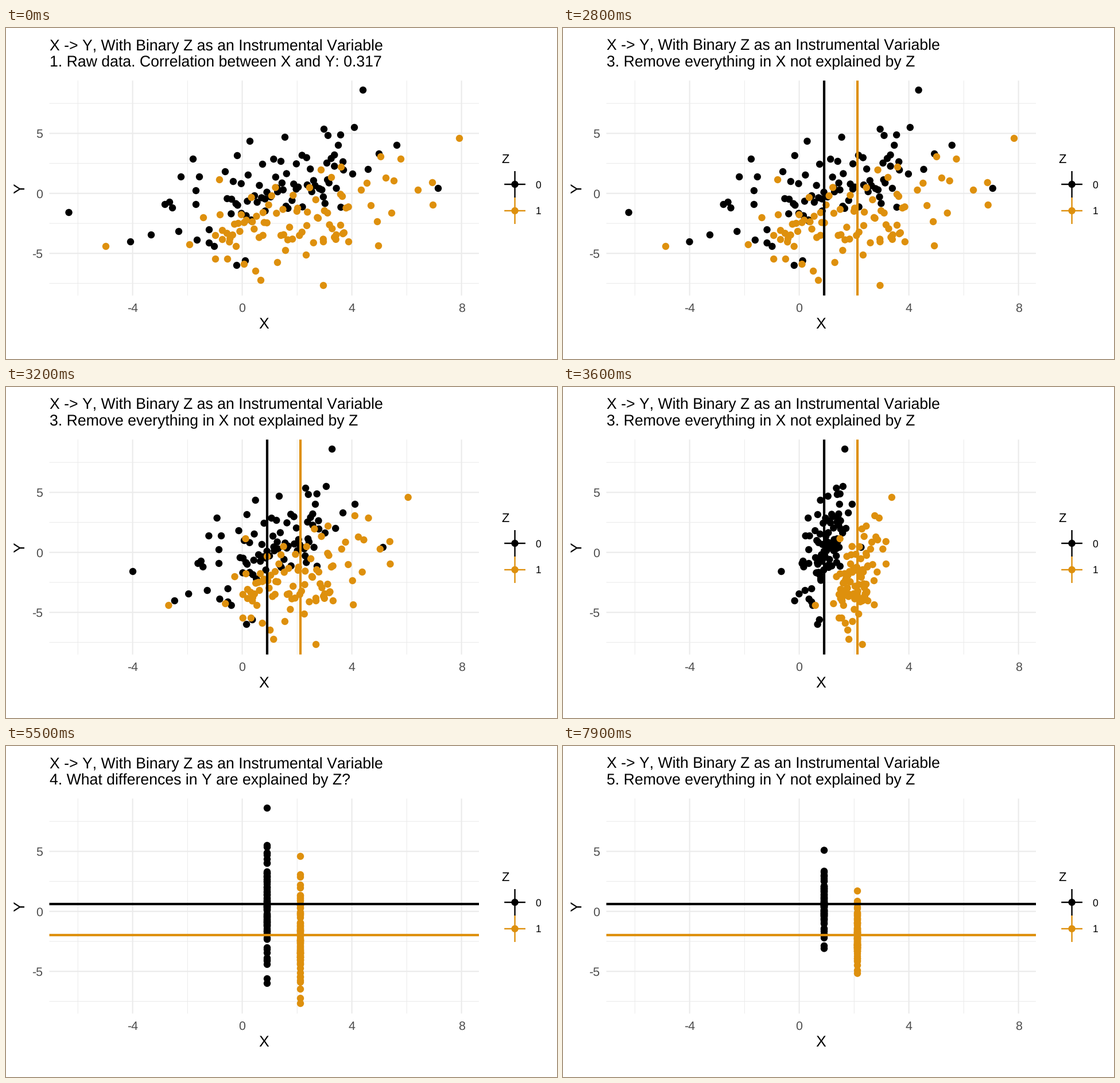
These frames come from a looping animation (960x576 px, 8 s). A matplotlib script:

```python
import numpy as np
import matplotlib.pyplot as plt
from matplotlib.animation import FuncAnimation
from matplotlib.collections import EllipseCollection

W, H, DPI = 960, 576, 96
FRAMES, STEP_MS = 80, 100
BLACK, ORANGE = "#000000", "#DE900D"
GRID, TICK = "#EBEBEB", "#4D4D4D"
LEFT, RIGHT, TOP, BOTTOM = 75.5, 824, 91.5, 465.5
DOT = 12.4

plt.rcParams.update({
    "font.family": "Liberation Sans",
    "text.hinting": "none",
    "text.kerning_factor": 6,  # switches kerning off
})

fig = plt.figure(figsize=(W / DPI, H / DPI), dpi=DPI, facecolor="white")
ax = fig.add_axes([0, 0, 1, 1])
ax.set_xlim(0, W)
ax.set_ylim(H, 0)
ax.axis("off")


def px(size):
    """Pixels to points."""
    return size * 72 / DPI


def line(xs, ys, color, width, z):
    return ax.plot(xs, ys, color=color, lw=px(width), zorder=z, snap=False,
                   solid_capstyle="butt")[0]


def vline(x, color, width, z=1):
    return line([x, x], [TOP, BOTTOM], color, width, z)


def hline(y, color, width, z=1):
    return line([LEFT, RIGHT], [y, y], color, width, z)


def label(x, y, text, size, color="black", ha="left", **kw):
    return ax.text(x, y, text, fontsize=px(size), color=color, ha=ha,
                   va="baseline", **kw)


def dots(places, color, z):
    n = len(places)
    group = EllipseCollection([DOT] * n, [DOT] * n, [0] * n, units="xy",
                              offsets=places, offset_transform=ax.transData,
                              facecolors=color, edgecolors="none", zorder=z)
    ax.add_collection(group)
    return group


def cloud(rng, n, x0, x1, mid, slope, spread):
    """Scattered points around a sloping line, evenly filled along x."""
    step = (x1 - x0) / n
    x = x0 + step * (np.arange(n) + rng.uniform(-0.3, 1.3, n))
    y = mid + slope * (x - (x0 + x1) / 2)
    y += spread * (rng.random(n) - rng.random(n))
    return np.column_stack([x, y])


def ease(t):
    return (1 - np.cos(np.pi * np.clip(t, 0, 1))) / 2


# Outlying points; the crowded middle is filled at random
far_black = [
    (109.5, 321), (217, 372), (253, 360), (301, 354), (277, 307), (285, 303),
    (290, 313), (305, 259), (326, 228), (337, 259), (331, 283), (331, 307),
    (333, 369), (354, 374), (363, 380), (354, 351), (402, 413), (417, 405),
    (382, 250), (403, 222), (425, 197), (486, 190), (479, 232), (447, 237),
    (554, 176), (561, 187), (583, 186), (579, 204), (607, 173), (622, 108),
    (681, 204), (650, 219), (631, 246), (604, 254), (753, 279), (559, 235),
]
far_orange = [
    (174, 380), (320, 377), (344, 330), (372, 264), (373, 325), (365, 361),
    (365, 402), (386, 402), (377, 368), (401, 380), (415, 411), (435, 423),
    (444, 439), (473, 408), (487, 387), (523, 395), (553, 448), (553, 372),
    (587, 358), (597, 372), (586, 293), (549, 247), (567, 260), (584, 242),
    (619, 282), (629, 270), (662, 261), (676, 266), (653, 224), (688, 228),
    (718, 282), (743, 269), (744, 308), (672, 322), (636, 309), (647, 337),
    (649, 379), (790, 192),
]
rng = np.random.default_rng(12)
black_start = np.vstack([far_black, cloud(rng, 56, 385, 590, 275, -0.2, 65)])
orange_start = np.vstack([far_orange, cloud(rng, 55, 378, 600, 333, -0.12, 68)])
black_mean, orange_mean = np.array([455, 275]), np.array([513, 329])

# Grid and tick labels
for k in range(4):
    vline(125.3 + 191 * k, GRID, 1.07)
    hline(131.2 + 104.4 * k, GRID, 1.07)
for k, text in enumerate(["-4", "0", "4", "8"]):
    x = 220.6 + 191 * k
    vline(x, GRID, 2.13, 2)
    label(x, 493.5, text, 21.33, TICK, "center")
for k, text in enumerate(["5", "0", "-5"]):
    y = 183.4 + 104.4 * k
    hline(y, GRID, 2.13, 2)
    label(64, y + 7.8, text, 21.33, TICK, "right")

# Axis names
label(449.7, 523.3, "X", 26.67, ha="center")
label(32, 279, "Y", 26.67, ha="center", rotation=90, rotation_mode="anchor")

# Legend
label(863, 234.6, "Z", 22)
for y, color, text in [(272, BLACK, "0"), (318, ORANGE, "1")]:
    line([886.6, 886.6], [y - 23, y + 23], color, 2.4, 3)
    line([868.2, 905], [y, y], color, 2.4, 3)
    dots([(886.6, y)], color, 4)
    label(922.5, y + 6.5, text, 17.6)

# Moving parts
black_dots = dots(black_start, BLACK, 5)
orange_dots = dots(orange_start, ORANGE, 6)
x_means = [vline(455, BLACK, 4.2, 7), vline(513, ORANGE, 4.2, 7)]
y_means = [hline(275, BLACK, 4.2, 7), hline(329, ORANGE, 4.2, 7)]
heading = label(75.5, 39, "X -> Y, With Binary Z as an Instrumental Variable", 26.67)
step_text = label(75.5, 67, "", 26.67)

# First frame and caption of each step
steps = [
    (0, "1. Raw data. Correlation between X and Y: 0.317"),
    (5, "2. What differences in X are explained by Z?"),
    (28, "3. Remove everything in X not explained by Z"),
    (51, "4. What differences in Y are explained by Z?"),
    (74, "5. Remove everything in Y not explained by Z"),
]


def update(i):
    caption = [text for start, text in steps if start <= i][-1]
    step_text.set_text(caption)
    heading.set_y(38 if "Remove" in caption else 39)

    pull = np.array([ease((i - 27) / 13), ease((i - 73) / 13)])
    black_dots.set_offsets(black_start + (black_mean - black_start) * pull)
    orange_dots.set_offsets(orange_start + (orange_mean - orange_start) * pull)

    for mark in x_means:
        mark.set_visible(9 <= i < 51)
    for mark in y_means:
        mark.set_visible(i >= 55)
    return [heading, step_text, black_dots, orange_dots, *x_means, *y_means]


anim = FuncAnimation(fig, update, frames=FRAMES, interval=STEP_MS,
                     repeat=True, repeat_delay=0, blit=False)
plt.show()
```
